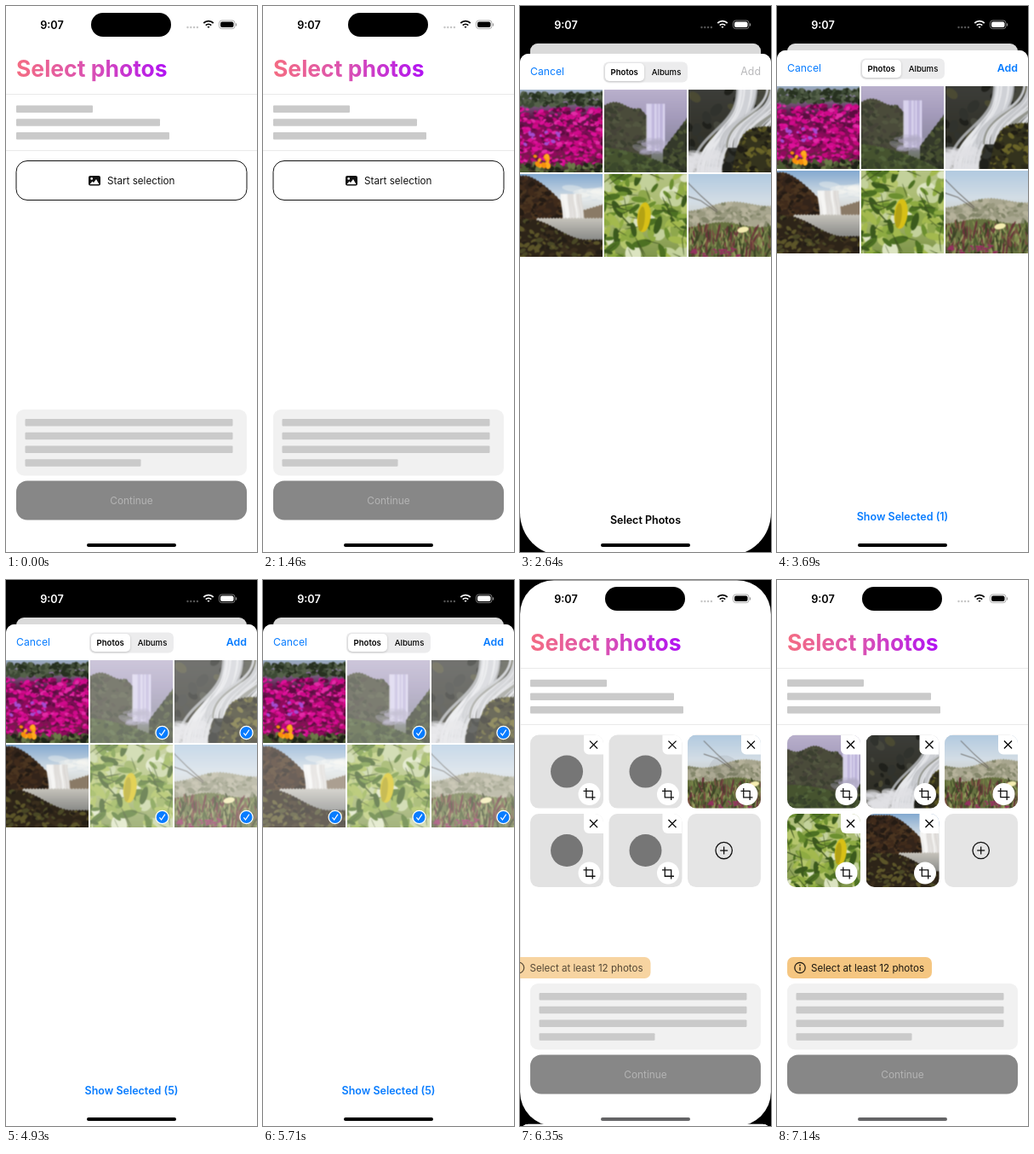
Animation of 295 by 640 pixels, one loop 7.21 s. Source, as an HTML page with a canvas:

```html
<!DOCTYPE html>
<html lang="en">
<head>
<meta charset="utf-8">
<title>Select photos</title>
<style>
html, body { margin: 0; width: 100%; height: 100%; overflow: hidden; background: #fff; }
canvas { display: block; width: 295px; height: 640px; }
</style>
</head>
<body>
<canvas id="stage"></canvas>
<script>
const W = 295, H = 640, LOOP = 7210, SHEET_TOP = 52, BLUE = '#087cff';
const OPEN = 2210, FIRST_TAP = 3690, TAP_GAP = 310, CLOSE = 5580, LOAD = 6350;
const PICKS = [1, 2, 5, 4, 3];
const canvas = document.getElementById('stage');
const dpr = window.devicePixelRatio || 1;
canvas.width = W * dpr;
canvas.height = H * dpr;
let g = canvas.getContext('2d');

const clamp = v => Math.max(0, Math.min(1, v));
const ramp = (t, from, length) => clamp((t - from) / length);
const smooth = v => v * v * (3 - 2 * v);
const spring = (t, from) => {
  const x = Math.max(0, t - from) * 0.0176;
  return 1 - (1 + x) * Math.exp(-x);
};
const grey = v => { const n = Math.round(v * 255); return `rgb(${n},${n},${n})`; };
const loadedAt = i => i === 2 ? CLOSE + 390 : LOAD + i * 110;

// Motion advances in even ticks while the sheet opens and after it closes.
function hold(t) {
  if (t < OPEN) return 0;
  const [from, tick] = t < CLOSE ? [OPEN, 107.5] : [CLOSE, 130];
  return from + Math.floor((t - from) / tick) * tick;
}

function paint(fill, stroke) {
  if (fill) { g.fillStyle = fill; g.fill(); }
  if (stroke) { g.strokeStyle = stroke; g.stroke(); }
}
function box(x, y, w, h, r, fill, stroke) {
  g.beginPath();
  g.roundRect(x, y, w, h, r);
  paint(fill, stroke);
}
function oval(x, y, rx, ry, tilt, fill) {
  g.beginPath();
  g.ellipse(x, y, rx, ry, tilt, 0, 7);
  paint(fill);
}
function disc(x, y, r, fill, stroke) {
  g.beginPath();
  g.arc(x, y, r, 0, 7);
  paint(fill, stroke);
}
function path(x, y, pts) {
  g.beginPath();
  for (let i = 0; i < pts.length; i += 2) g.lineTo(x + pts[i], y + pts[i + 1]);
}
function line(x, y, color, width, ...pts) {
  path(x, y, pts);
  g.lineWidth = width;
  paint(null, color);
}
function cross(x, y, r, color, turn) {
  g.save();
  g.translate(x, y);
  g.rotate(turn);
  line(0, 0, color, 1.3, -r, 0, r, 0);
  line(0, 0, color, 1.3, 0, -r, 0, r);
  g.restore();
}
function text(s, x, y, size, weight, color, align = 'left') {
  g.font = `${weight} ${size}px Inter, sans-serif`;
  g.textAlign = align;
  g.fillStyle = color;
  g.fillText(s, x, y + size * 0.364);
}

// Photos: gradients, ridges and seeded texture on a 150 x 100 field.
let seed = 1;
const rnd = () => (seed = seed * 16807 % 2147483647) / 2147483647;
const pick = list => list[Math.floor(rnd() * list.length)];
function blend(from, to, ...colors) {
  const grad = g.createLinearGradient(0, from, 0, to);
  colors.forEach((c, i) => grad.addColorStop(i / (colors.length - 1), c));
  return grad;
}
function sky(...colors) {
  g.fillStyle = blend(0, 100, ...colors);
  g.fillRect(0, 0, 150, 100);
}
function scatter(n, [x, y, w, h], rx, ry, tilt, ...colors) {
  while (n--) {
    const k = 0.5 + rnd();
    oval(x + rnd() * w, y + rnd() * h, rx * k, ry * k, (rnd() - 0.5) * tilt, pick(colors));
  }
}
// Fills from a curve down to the base line and mottles the inside.
function ridge(x0, x1, curve, base, fill, ...mottle) {
  g.save();
  g.beginPath();
  g.moveTo(x0, base);
  for (let x = x0; x <= x1; x++) g.lineTo(x, curve(x) + Math.sin(x * 1.7) * 0.7);
  g.lineTo(x1, base);
  paint(fill);
  g.clip();
  if (mottle.length) scatter((x1 - x0) * 3, [x0, 0, x1 - x0, base], 3.5, 2, 2, ...mottle);
  g.restore();
}
// Fine strands of falling water along an eased sideways path.
function strands(n, x, top, spread, bottom, shift, ...colors) {
  while (n--) {
    const a = x + rnd() * spread, b = a + shift * (0.8 + rnd() * 0.4);
    const mid = (top + bottom) / 2;
    g.beginPath();
    g.moveTo(a, top);
    g.bezierCurveTo(a, mid, b, mid, b, bottom);
    g.lineWidth = 1 + rnd() * 2.5;
    paint(null, pick(colors));
  }
}
const FULL = [0, 0, 150, 100];
const scenes = [
  () => {
    sky('#9fb4c8', '#5b1747', '#8f0a5c', '#3d3d2a');
    scatter(300, [0, 5, 150, 14], 3, 2, 3, '#26301f', '#3d4a35', '#55614a');
    scatter(700, [0, 23, 150, 68], 3, 1.8, 1, '#c3087c', '#dd119a', '#d00a8c', '#e22ba6', '#8f0a5c', '#5c0c40');
    scatter(16, [25, 48, 60, 18], 2, 1.5, 2, '#a64bd0');
    scatter(120, [0, 90, 150, 10], 3, 2, 3, '#4b5a32', '#6c7a48', '#1f2418');
    scatter(14, [43, 80, 17, 13], 3, 2.4, 3, '#f7900c', '#ffac1d');
  },
  () => {
    sky('#b9b0cc', '#a49bbb', '#8d8aa0', '#56643c');
    ridge(0, 82, x => 19 + 4 * Math.sin(x / 8) + Math.max(0, x - 68) * 1.5, 85, '#4a4b3a', '#3b3f30', '#525640', '#454338');
    strands(70, 77, 17, 20, 74, 0, 'rgba(226,220,244,.6)', 'rgba(178,168,212,.6)');
    scatter(25, [68, 62, 32, 14], 7, 3, 1, 'rgba(175,168,196,.35)');
    ridge(96, 150, x => 72 - (x - 96) * 1.3, 100, '#34392a', '#424b2e', '#272e20', '#4c5534');
    ridge(0, 122, x => 68 + x * x * 0.0022, 100, '#46532f', '#52633a', '#3b482b', '#36402a');
  },
  () => {
    sky('#3c3d39', '#33332b', '#2b2a20');
    scatter(90, FULL, 6, 4, 3, '#30322d', '#45463c', '#1f201b', '#4b4a33');
    strands(60, 84, -4, 24, 104, -48, '#cfd1d6', '#e6e7ea', '#a4a6a8');
    strands(35, 120, -4, 34, 70, -48, '#c4c6ca', '#dedfe3', '#94968f');
    ridge(78, 150, x => 44 + 55 * Math.exp((78 - x) / 8), 100, '#34331d', '#575322', '#6a6428', '#1f1d14', '#2d2a1a');
    scatter(60, [0, 78, 60, 24], 9, 4, 1, 'rgba(225,226,230,.5)');
  },
  () => {
    sky('#83a9d0', '#dfe4e6', '#b8b5ac', '#392f20');
    scatter(25, [88, 16, 62, 14], 10, 3, 0.4, 'rgba(245,244,240,.4)');
    ridge(100, 150, x => 44 - (x - 100) * 0.3, 56, '#8a7a66');
    ridge(0, 80, x => 2 + Math.max(0, x - 32) ** 1.5 / 9, 60, '#33241a', '#402b1b', '#241b14', '#4b3520');
    strands(70, 74, 24, 24, 54, 3, 'rgba(247,247,245,.7)', 'rgba(218,216,212,.6)');
    ridge(45, 150, () => 53, 100, blend(52, 78, '#c9c6be', '#8c8d8a'));
    ridge(0, 150, x => 54 + 25 * smooth(ramp(x, 35, 70)), 100, '#2d2418', '#4a4826', '#241e16', '#5c5529', '#3a2e1d');
  },
  () => {
    sky('#b4c283', '#a8ba6c', '#7f954b');
    scatter(70, FULL, 9, 7, 3, '#c3d19b', '#dce4c1', '#8fa84c', '#b5c66c');
    scatter(130, FULL, 8, 3, 3, '#4c7022', '#6b8f30', '#3b5a1d', '#8eab42', '#a3b94e');
    scatter(50, FULL, 12, 0.5, 3, '#3e5420');
    oval(73, 52, 8, 18, 0.1, '#d8c016');
    oval(70, 54, 4, 15, 0.1, '#b3a214');
  },
  () => {
    sky('#b2cae0', '#d3dde5', '#c8c6b8', '#607344');
    ridge(0, 150, x => 42 + 4 * Math.sin(x / 16) - x * 0.06, 75, '#a8a68f', '#98987e', '#b6b29b', '#83866a');
    ridge(0, 150, x => 61 + 3 * Math.sin(x / 14), 100, '#66713f');
    scatter(500, [0, 64, 150, 38], 0.9, 5, 1, '#7f8a4c', '#4c5a30', '#7a4f40', '#69343a', '#9aa062', '#3c4426');
    scatter(25, [25, 90, 65, 9], 2.5, 1, 1, '#94305f');
    for (const k of [0, 1]) line(22, 8 + k * 18, '#55504a', 0.8, 0, 0, 18, 18 - k * 12, 38, 36 - k * 16);
    oval(91, 67, 7, 3.5, -0.2, '#f5edb1');
  }
];
function makePhoto(scene, i) {
  const [sharp, soft] = [0, 1].map(() => Object.assign(document.createElement('canvas'), { width: 450, height: 300 }));
  const main = g;
  g = sharp.getContext('2d');
  g.scale(3, 3);
  seed = 97 + i * 31;
  scene();
  g = main;
  const s = soft.getContext('2d');
  s.drawImage(sharp, 0, 0);
  s.filter = 'blur(2px)';
  s.drawImage(sharp, 0, 0);
  return soft;
}
const photos = scenes.map(makePhoto);

function drawStatus(light) {
  const color = grey(light);
  box(100, 8, 94, 28, 14, '#000');
  text('9:07', 54, 22, 12.7, 600, color, 'center');
  for (let i = 0; i < 4; i++) disc(213.5 + i * 3.8, 25, 1.2, light > 0.6 ? '#555' : '#c6c6c6');
  g.lineWidth = 1.8;
  for (const r of [1.2, 4.7, 8.3]) {
    g.beginPath();
    g.arc(238, 26, r, -2.33, -0.81);
    paint(null, color);
  }
  g.lineWidth = 0.8;
  box(250.5, 17, 18.5, 9.6, 3, null, '#999');
  box(252, 18.5, 15.5, 6.6, 2, color);
  box(270, 20.2, 1.1, 3.2, 0.5, '#999');
}

function plusTile(x, y) {
  box(x, y, 86, 86, 10, '#e5e5e5');
  g.lineWidth = 1.3;
  disc(x + 42.7, y + 43, 9.7, null, '#111');
  cross(x + 42.7, y + 43, 4.5, '#111', 0);
}
function cropButton(x, y) {
  disc(x, y, 13, '#fff');
  for (const k of [1, -1]) line(x, y, '#111', 1.3, -3.7 * k, -7 * k, -3.7 * k, 3.7 * k, 7 * k, 3.7 * k);
}
function photoTile(i, x, y, t) {
  const corner = ramp(t, 5900, 250);
  const veil = 1 - ramp(t, loadedAt(i), 300);
  g.save();
  box(x, y, 86, 86, 10, '#e2e2e2');
  g.clip();
  if (t >= loadedAt(i)) g.drawImage(photos[PICKS[i]], 0, 0, 300, 300, x, y, 86, 86);
  disc(x + 43, y + 43, 19, `rgba(60,60,60,${0.65 * veil})`);
  box(x + 63, y, 23, 23, [0, 0, 0, 6], grey(0.88 + 0.12 * corner));
  g.restore();
  cross(x + 74.5, y + 11.5, 6.4, `rgba(0,0,0,${Math.min(1, 0.25 + corner)})`, Math.PI / 4);
  cropButton(x + 69.5, y + 69.5);
}

function drawNotice(t) {
  const k = ramp(t, 5860, 500);
  g.save();
  g.globalAlpha = k;
  g.translate(-170 * (1 - smooth(k)), 0);
  box(12, 442, 170, 25, 7, '#f5c681');
  g.lineWidth = 1.2;
  disc(27, 454.5, 6.2, null, '#1c1710');
  line(27, 454.5, '#1c1710', 1.3, 0, -0.8, 0, 3.2);
  disc(27, 451.5, 0.9, '#1c1710');
  text('Select at least 12 photos', 40, 454.5, 11.6, 400, '#1c1710');
  g.restore();
}

function startButton(t) {
  g.save();
  if (t >= OPEN) g.globalAlpha = 0.5;
  g.lineWidth = 1;
  box(12, 181.5, 271, 46, 13, '#fff', '#111');
  box(97, 199, 14, 11.5, 2, '#111');
  disc(100.7, 202.4, 1.3, '#fff');
  path(98.5, 209, [0, 0, 3, -3.5, 4.5, -2, 7.5, -6, 11, 0]);
  paint('#fff');
  text('Start selection', 119, 204.5, 11.7, 400, '#111');
  g.restore();
}

function textBars(x, y, ...widths) {
  widths.forEach((w, i) => box(x, y + i * 15.75, w, 8.5, 1, '#cacaca'));
}
function drawPage(t) {
  g.fillStyle = '#fff';
  g.fillRect(0, 0, W, H);
  const title = g.createLinearGradient(12, 0, 192, 0);
  ['#f46c82', '#d950b5', '#b010f5'].forEach((c, i) => title.addColorStop(i / 2, c));
  text('Select photos', 12, 73.5, 26.5, 700, title);
  g.fillStyle = '#e4e4e4';
  for (const y of [103, 169]) g.fillRect(0, y, W, 0.8);
  textBars(12, 116.5, 90, 169, 180);
  if (t < 5800) startButton(t);
  else {
    for (let i = 0; i < 6; i++) {
      const x = 12 + i % 3 * 92.5, y = 181.5 + Math.floor(i / 3) * 92.5;
      if (i < 5) photoTile(i, x, y, t);
      else plusTile(x, y);
    }
    drawNotice(t);
  }
  box(12, 473, 271, 77.5, 9, '#f1f1f1');
  textBars(22.5, 484, 244, 244, 244, 136);
  box(12, 556.5, 271, 46, 13, '#878787');
  text('Continue', 147.5, 579.5, 11.9, 400, '#b4b4b4', 'center');
}

function drawCheck(x, y) {
  g.lineWidth = 1.3;
  disc(x, y, 7.6, BLUE, '#fff');
  line(x, y, '#fff', 1.2, -3.2, 0.3, -1, 3, 3.3, -3.3);
}
function drawSheet(t, p, count) {
  const opening = t < CLOSE;
  const checked = PICKS.slice(0, opening ? Math.max(0, count - 1) : 5);
  const foot = opening && p < 0.999 ? 50 : 0;
  g.save();
  g.translate(0, SHEET_TOP + (H - SHEET_TOP) * (1 - p));
  box(0, 0, W, H - SHEET_TOP, [10, 10, foot, foot], '#fff');
  g.clip();
  const scroll = opening ? -15.4 * (1 - p) : 0;
  for (let i = 0; i < 6; i++) {
    const x = i % 3 * 98.9, y = 42 + scroll + Math.floor(i / 3) * 99;
    g.drawImage(photos[i], 75, 0, 300, 300, x, y, 97.4, 97.4);
    if (!checked.includes(i)) continue;
    g.fillStyle = 'rgba(255,255,255,.28)';
    g.fillRect(x, y, 97.4, 97.4);
    drawCheck(x + 84.7, y + 85);
  }
  g.fillStyle = grey(opening ? 1 - 0.075 * (1 - p) : 1);
  g.fillRect(0, 0, W, 42);
  text('Cancel', 12, 20.7, 12.2, 400, BLUE);
  text('Add', 283, 20.7, 12.4, count ? 600 : 400, count ? BLUE : '#b9b9bb', 'right');
  box(98, 9.5, 99, 24, 6, '#ececed');
  g.save();
  g.shadowColor = 'rgba(0,0,0,.18)';
  g.shadowBlur = 3 * dpr;
  g.shadowOffsetY = dpr;
  box(100, 11, 46, 21, 5, '#fff');
  g.restore();
  text('Photos', 122.7, 21.2, 9.6, 600, '#000', 'center');
  text('Albums', 172, 21.2, 9.6, 500, '#000', 'center');
  text(count ? `Show Selected (${count})` : 'Select Photos', 147.5, 546.3, 12.5, 600, count ? BLUE : '#000', 'center');
  g.restore();
}

function draw(now) {
  const t = hold(now), opening = t < CLOSE;
  const count = Math.max(0, Math.min(5, 1 + Math.floor((now - FIRST_TAP) / TAP_GAP)));
  let p = opening ? spring(count ? FIRST_TAP : Math.min(t, OPEN + 430), 2239) : 1 - spring(t, 5792);
  if (p < 0.002) p = 0;
  g.setTransform(dpr, 0, 0, dpr, 0, 0);
  g.fillStyle = '#000';
  g.fillRect(0, 0, W, H);

  const scale = 1 - 0.0814 * p;
  g.save();
  g.translate(W / 2 * (1 - scale), 44 * p);
  g.scale(scale, scale);
  if (p) {
    g.beginPath();
    g.roundRect(0, 0, W, H, 10 + 30 * (1 - p));
    g.clip();
  }
  drawPage(t);
  g.fillStyle = `rgba(0,0,0,${0.145 * p})`;
  g.fillRect(0, 0, W, H);
  g.restore();

  drawStatus(opening ? ramp(t, 2320, 250) : 1 - ramp(t, 5830, 290));
  if (p) drawSheet(t, p, count);
  box(95, 630, 105, 4, 2, t < 5800 ? '#000' : '#646466');
}

const start = performance.now();
function tick() {
  draw((performance.now() - start) % LOOP);
  requestAnimationFrame(tick);
}
tick();
</script>
</body>
</html>
```
